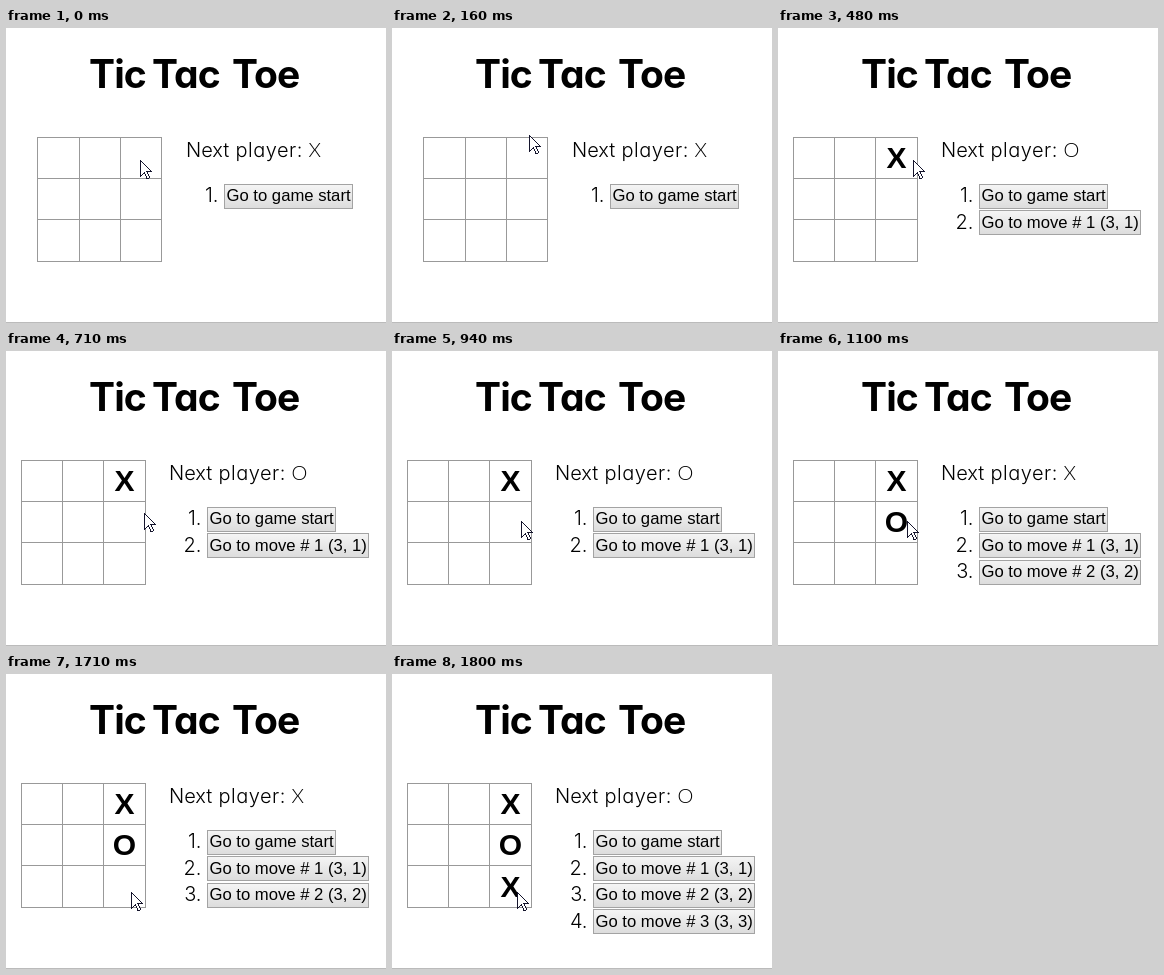
Recreate the animation shown at these times as an HTML page. Size 380 by 295 pixels, loop 1880 ms.

```html
<!DOCTYPE html>
<html lang="en">
<head>
<meta charset="utf-8">
<title>Tic Tac Toe</title>
<style>
  html, body { margin: 0; width: 100%; height: 100%; overflow: hidden; background: #fff; }
  svg { display: block; width: 380px; height: 295px; }
  text { fill: #000; }
  .title { font: 700 39px Inter, "Open Sans", sans-serif; letter-spacing: -.9px; font-feature-settings: "cv11"; }
  .info { font: 300 20px Inter, "Open Sans", sans-serif; font-feature-settings: "cv11"; }
  .wide { letter-spacing: .5px; }
  .turn { font: 300 20px Lato, Inter, sans-serif; }
  .num { text-anchor: end; }
  .label { font: 16.67px "Liberation Sans", Arial, sans-serif; }
  .mark { font: 700 30px "Liberation Sans", Arial, sans-serif; text-anchor: middle; }
  .line { fill: none; stroke: #999; }
  .button { fill: url(#face); stroke: #a3a3a3; }
</style>
</head>
<body>
<svg viewBox="0 0 380 295">
  <defs>
    <linearGradient id="face" x1="0" y1="0" x2="0" y2="1">
      <stop offset="0" stop-color="#f5f5f5"/>
      <stop offset="1" stop-color="#dcdcdc"/>
    </linearGradient>
  </defs>
  <g class="title">
    <text x="83" y="60">Tic</text>
    <text x="146" y="60">Tac</text>
    <text x="226" y="60">Toe</text>
  </g>
  <path d="M0 294.5H380" stroke="#bbb"/>
  <g id="game"></g>
  <path id="cursor" d="M.5 .5V16.5L4.5 12.5L7 18.5H8.5L9.5 17L7 11.5H11.5Z" fill="#fff" stroke="#14142c" shape-rendering="crispEdges"/>
</svg>
<script>
const LOOP = 1880;
const MOVE_TIMES = [330, 1100, 1800];

// time, x, y of the pointer tip
const POINTER = [
  [0, 134, 132], [90, 119, 116], [160, 137, 107], [330, 134, 122],
  [390, 134, 124], [470, 135, 132], [550, 137, 143], [630, 138, 154],
  [710, 138, 162], [790, 136, 167], [870, 131, 169], [940, 129, 170],
  [1160, 129, 178], [1240, 128, 194], [1310, 126, 210], [1390, 125, 218]
];

const game = document.getElementById('game');
const cursor = document.getElementById('cursor');

const text = (cls, x, y, str) => `<text class="${cls}" x="${x}" y="${y}">${str}</text>`;
const player = n => n % 2 ? 'O' : 'X';

function board(left, moves) {
  const top = 108.9, pitch = 41.25;
  const edge = (start, i) => Math.round(start + i * pitch) + .5;
  const x0 = edge(left, 0), x3 = edge(left, 3);
  const y0 = edge(top, 0), y3 = edge(top, 3);
  let d = '', marks = '';
  for (let i = 0; i < 4; i++) {
    d += `M${edge(left, i)} ${y0}V${y3}M${x0} ${edge(top, i)}H${x3}`;
  }
  for (let i = 0; i < moves; i++) {
    marks += text('mark', left + 103.6, 140 + Math.round(i * pitch), player(i));
  }
  return `<path class="line" stroke-linecap="square" d="${d}"/>` + marks;
}

function history(x, moves) {
  let out = '';
  for (let i = 0; i <= moves; i++) {
    const y = 156 + i * 26.5;
    const textY = Math.round(y);
    const label = i ? `Go to move # ${i} (3, ${i})` : 'Go to game start';
    out += text('info num', x + 31.5, textY + 18, `${i + 1}.`)
      + `<rect class="button" x="${x + 37.5}" y="${Math.floor(y) + .5}" width="${i ? 161 : 128}" height="24"/>`
      + text('label', x + 39.5, textY + 17, label);
  }
  return out;
}

function drawGame(moves) {
  const left = moves ? 14.9 : 31.4;
  const x = moves ? 164 : 181;
  game.innerHTML = board(left, moves)
    + text('info', x - 1, 129, 'Next')
    + text('info wide', x + 48.5, 129, 'player:')
    + text('turn', x + 121.5, 129, player(moves))
    + history(x, moves);
}

let shown = -1;
function render(t) {
  const moves = MOVE_TIMES.filter(m => t >= m).length;
  if (moves !== shown) drawGame(shown = moves);
  const [, x, y] = POINTER.filter(p => t >= p[0]).pop();
  cursor.setAttribute('transform', `translate(${x} ${y})`);
}

const start = performance.now();
function tick() {
  render((performance.now() - start) % LOOP);
  requestAnimationFrame(tick);
}
tick();
</script>
</body>
</html>
```
